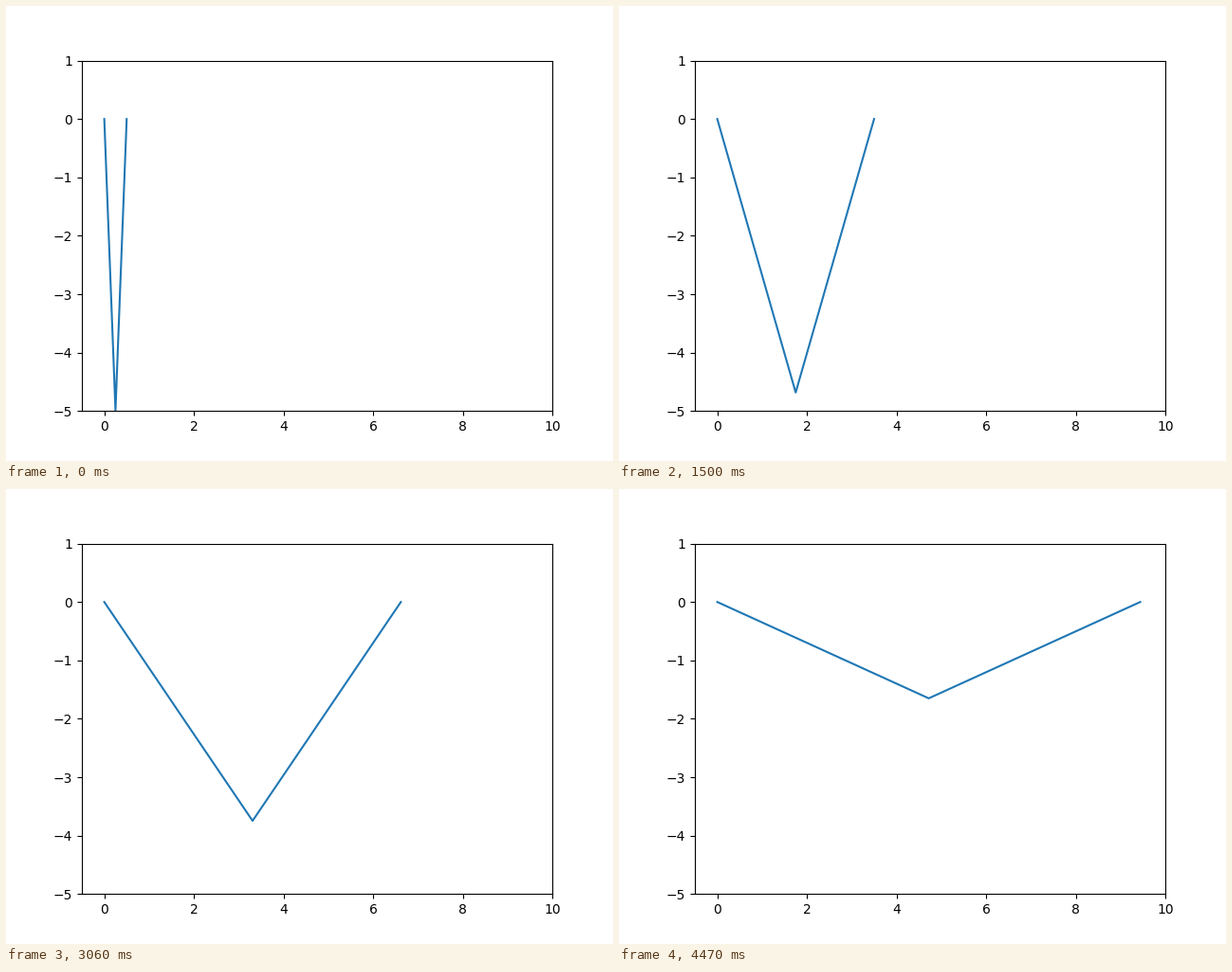
Write a matplotlib script that moves like this. It is 640x480 px and loops after 4.5 s.

```python
import math

import matplotlib.pyplot as plt
from matplotlib.animation import FuncAnimation

FRAMES = 150
INTERVAL = 30
ARM = 5.0           # length of each of the two equal segments
START, STEP = 0.5, 0.06

fig, ax = plt.subplots(figsize=(6.4, 4.8), dpi=100)
ax.set_xlim(-0.5, 10)
ax.set_ylim(-5, 1)
line, = ax.plot([], [])


def update(i):
    """Slide the right end outwards; the joint rises to keep both arms rigid."""
    end = START + STEP * i
    mid = end / 2
    line.set_data([0, mid, end], [0, -math.sqrt(ARM**2 - mid**2), 0])
    return line,


anim = FuncAnimation(fig, update, frames=FRAMES, interval=INTERVAL,
                     init_func=lambda: update(0), repeat=True, repeat_delay=0)
plt.show()
```
